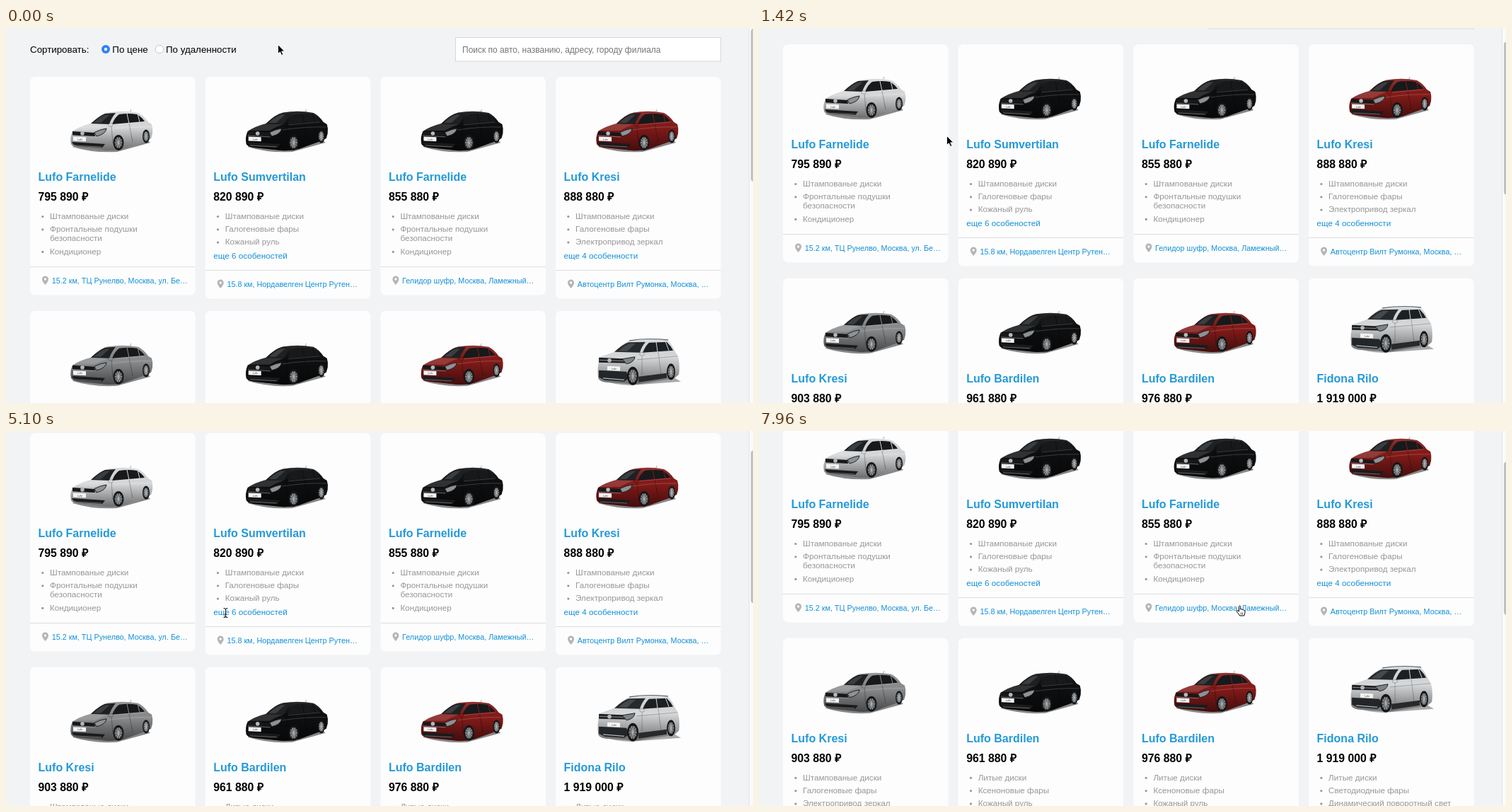
An HTML page for the animation above (8 s loop, 1056 by 530 pixels).

```html
<!DOCTYPE html>
<html lang="ru">
<head>
<meta charset="utf-8">
<title>Каталог</title>
<style>
  html, body { margin: 0; width: 100%; height: 100%; overflow: hidden; background: #f2f3f5; }
  svg { display: block; font-family: "Liberation Sans", Arial, sans-serif; }
  .head { font-size: 13.33px; }
  .hint { font-size: 12px; fill: #757575; }
  .title { font-size: 16px; font-weight: bold; fill: #2599d8; }
  .price { font-size: 15.8px; font-weight: bold; }
  .item { font-size: 11.7px; fill: #979797; }
  .more { font-size: 11.7px; fill: #1490d6; }
  .place { font-size: 10.8px; fill: #1490d6; }
  .plate { font-size: 3.6px; fill: #444; }
</style>
</head>
<body>
<svg id="stage" width="1056" height="530" viewBox="0 0 1056 530">
  <linearGradient id="shade" x2="0" y2="1">
    <stop offset="0" stop-color="#fff" stop-opacity=".12"/>
    <stop offset=".4" stop-color="#000" stop-opacity="0"/>
    <stop offset="1" stop-color="#000" stop-opacity=".5"/>
  </linearGradient>
</svg>
<script>
const LOOP = 8000, TICK = 117;

const path = (d, fill, extra = '') => `<path d="${d}" fill="${fill}" ${extra}/>`;
const line = (d, color, width = 1) => path(d, 'none', `stroke="${color}" stroke-width="${width}"`);
const oval = (x, y, rx, ry, fill, extra = '') =>
  `<ellipse cx="${x}" cy="${y}" rx="${rx}" ry="${ry}" fill="${fill}" ${extra}/>`;
const text = (x, y, cls, s) => `<text x="${x}" y="${y}" class="${cls}">${s}</text>`;
const shift = (x, y, s) => `<g transform="translate(${x} ${y})">${s}</g>`;

// Cars
const body = (d, color) => path(d, color) + path(d, 'url(#shade)');
const plate = (x, y) =>
  path(`M${x} ${y}l18 .8v6l-18 -.8z`, '#f4f4f4') + text(x + 6, y + 5, 'plate', 'Lufo');
const mirror = (x, y, color) => oval(x, y, 3.5, 2.3, color, 'stroke="#0006" stroke-width=".6"');
const badge = (x, y) => oval(x, y, 2.8, 2.8, '#b4b8bb');

function wheel(x, y, rx, ry) {
  let spokes = '';
  for (let i = 0; i < 10; i++) {
    const a = i * Math.PI / 5;
    spokes += line(`M${x} ${y}l${rx * .7 * Math.cos(a)} ${ry * .7 * Math.sin(a)}`, '#b5b7b9', .9);
  }
  return oval(x, y, rx, ry, '#141517') + oval(x, y, rx * .72, ry * .72, '#55585a') + spokes;
}

function sedan(color) {
  return path('M3 53Q32 62 66 60L113 47L102 38H20Z', '#0007') +
    line('M84 5L86 0', '#777', .6) +
    body('M1 49Q-1 39 3 31Q13 24 29 20Q42 7 53 4.500Q75 1 96 5Q104 9 110 18L115 21Q117 27 116 34L114 41L103 46L75 56Q62 59 50 58L12 54Q3 53 1 49Z', color) +
    path('M4 30Q15 23 29 20.500L54 21Q44 24 34 30Z', '#fff', 'opacity=".14"') +
    path('M29 20Q41 9 49 6L64 5Q58 12 55 21Z', '#1e2123') +
    path('M33 19Q42 10 50 7.500H56L43 19Z', '#fff', 'opacity=".13"') +
    path('M59 21Q63 11 69 7Q82 5 94 7Q101 11 105 17Z', '#17191b') +
    line('M80 6L83 20M95 6L98 18', color, 1) +
    line('M59 22L105 18M52 29Q85 24 114 25', '#fff4', .7) +
    line('M58 23L60 48M83 20L88 46', '#0007', .6) +
    path('M3 31L34 33L35 38L3 36.500Z', '#17181a') +
    line('M3 37L35 39', '#a0a4a7', .6) +
    path('M34 32.500Q43 28 51 27Q50 35 37 38Z', '#8d9296', 'stroke="#222" stroke-width="1"') +
    path('M2 46L49 49L45 54L10 52Q4 51 2 46Z', '#191b1d') +
    line('M6 51L44 53', '#999c9f', .6) +
    badge(17, 34) + plate(4, 38.5) + mirror(57, 22, color) +
    wheel(68, 47, 7.5, 11) + wheel(107, 38, 5, 9.5);
}

function suv(color) {
  return path('M2 59Q28 68 50 67L118 62L104 54H20Z', '#0005') +
    body('M1 57Q-1 39 4 27L24 20Q35 9 43 5Q68 0 99 3Q106 10 110 20L114 26Q117 40 115 52L108 58L56 66L12 63Q3 62 1 57Z', color) +
    line('M45 4Q70 0 100 3', '#5b5f62', 1.2) +
    path('M24 20Q36 9 44 6.500L68 6Q62 13 60 21Z', '#262a2d') +
    path('M30 19Q39 10 46 8H54L42 19Z', '#fff', 'opacity=".15"') +
    path('M64 21Q68 11 73 7L98 6Q104 12 107 18Z', '#1d2022') +
    line('M83 6L85 20M96 5L101 18', color, 1) +
    line('M56 31L113 26M63 23V52M86 20L90 53', '#0005', .7) +
    path('M58 55L98 50V57L58 63Z', '#27292b') +
    path('M2 28L44 30L46 36L2 35Z', '#1e2123') +
    line('M3 31.500L43 33', '#a9adb0', .8) +
    path('M35 30L53 27Q52 35 41 37Z', '#7d8387', 'stroke="#222" stroke-width="1"') +
    path('M2 46L41 48L45 57L38 62L10 60L2 56Z', '#232628') +
    line('M8 57L38 59.500', '#b4b7b9', 1.2) +
    badge(17, 32) + plate(14, 40) + mirror(63, 23, color) +
    wheel(50, 54, 8, 13) + wheel(104, 48, 6, 11.5);
}

// Page
const WHITE = '#d6d8da', BLACK = '#0e0f10', RED = '#831b19', GREY = '#8a8c8e';
const bags = ['Штампованые диски', 'Фронтальные подушки', '~безопасности', 'Кондиционер'];
const basic = ['Штампованые диски', 'Галогеновые фары', 'Кожаный руль'];
const mirrors = ['Штампованые диски', 'Галогеновые фары', 'Электропривод зеркал'];
const alloy = ['Литые диски', 'Ксеноновые фары', 'Кожаный руль'];
const city = ['Литые диски', 'Светодиодные фары', 'Динамический поворотный свет'];
const cars = [
  [sedan(WHITE), 'Lufo Farnelide', '795 890', bags, '', '15.2 км, ТЦ Рунелво, Москва, ул. Бе…'],
  [sedan(BLACK), 'Lufo Sumvertilan', '820 890', basic, 'еще 6 особеностей', '15.8 км, Нордавелген Центр Рутен…'],
  [sedan(BLACK), 'Lufo Farnelide', '855 880', bags, '', 'Гелидор шуфр, Москва, Ламежный…'],
  [sedan(RED), 'Lufo Kresi', '888 880', mirrors, 'еще 4 особенности', 'Автоцентр Вилт Румонка, Москва, …'],
  [sedan(GREY), 'Lufo Kresi', '903 880', mirrors],
  [sedan(BLACK), 'Lufo Bardilen', '961 880', alloy],
  [sedan(RED), 'Lufo Bardilen', '976 880', alloy],
  [shift(2, -8, suv(WHITE)), 'Fidona Rilo', '1 919 000', city]
];
const pin = path('M0 6Q-4.500 1 -4.500 -2A4.500 4.500 0 0 1 4.500 -2Q4.500 1 0 6Z', '#b5b5b5') +
  oval(0, -2, 1.7, 1.7, '#fdfdfe');

function card([car, title, price, items, more = '', place = ''], i) {
  const tall = more ? 5 : 0;
  let y = 182.5, list = '';
  for (const item of items) {
    const wrapped = item[0] === '~';
    y += wrapped ? 13.3 : 18.3;
    if (!wrapped) list += oval(17.8, y - 3.3, 1.6, 1.6, '#979797');
    list += text(28, y, 'item', item.replace('~', ''));
  }
  const foot = line('M0 268.500H233.500', '#dcdddf') + shift(21.5, 288, pin) +
    text(30.7, 292.3, 'place', place);
  return shift(34 + i % 4 * 247.7, i < 4 ? 69 : 399.8,
    `<rect width="233.5" height="${308.5 + tall}" rx="7" fill="#fdfdfe"/>` +
    shift(57, 46, car) + text(11.5, 147.3, 'title', title) + text(11.5, 175, 'price', price + ' ₽') +
    list + text(11.5, 257.3, 'more', more) + shift(0, tall, foot));
}

const header =
  text(34, 35, 'head', 'Сортировать:') +
  oval(141, 30, 6, 6, '#2f82f5') + oval(141, 30, 2.2, 2.2, '#fff') +
  text(150.3, 34.6, 'head', 'По цене') +
  oval(217, 30, 5.7, 5.7, '#fff', 'stroke="#c9c9cb"') +
  text(226, 34.6, 'head', 'По удаленности') +
  '<rect x="635.5" y="13.5" width="375" height="33.5" fill="#fff" stroke="#d5d7da"/>' +
  text(645, 35, 'hint', 'Поиск по авто, названию, адресу, городу филиала');

// Each cursor has its hot spot at 0, 0
const cursors = {
  arrow: path('M.5 .5V13.500L3.400 10.700L5.600 15.400L7.800 14.400L5.700 9.900H9.700Z', '#000', 'stroke="#fff" stroke-width=".9"'),
  hand: path('M-1 8V2Q-1 .6 .1 .6T1.200 2V5.500Q3 4.700 3.500 6Q5.300 5.500 5.700 6.800Q7.600 6.500 7.600 8.300Q7.600 11 6.300 14.500H0Q-1.300 11.500 -4 9.300Q-4.600 7.700 -3.300 7.400Q-2 7.300 -1 8.800Z', '#fff', 'stroke="#000"') +
    line('M2 10V13M4 10V13', '#000', .7),
  beam: line('M-3 -6.500Q0 -6.500 0 -4.500V4.500Q0 6.500 -3 6.500M3 -6.500Q0 -6.500 0 -4.500M0 4.500Q0 6.500 3 6.500M-1.500 2H1.500', '#222', 1.1)
};

// Key points: tick, then value
const scrollKeys = [[2, 0], [8, 11], [12, 46], [14, 65], [49, 66], [50, 82], [62, 82], [64, 88], [66, 107]];
const pointerKeys = [
  [0, 384, 23], [1, 379, 23], [8, 308, 81], [12, 265, 152], [16, 282, 196], [21, 63, 290],
  [24, 137, 325], [29, 223, 274], [31, 193, 270], [33, 283, 261], [35, 310.5, 257],
  [49, 310.5, 257], [51, 315, 339], [54, 317, 362], [58, 317, 362], [62, 357.5, 280.5],
  [66, 433, 271], [67, 433, 271], [68, 679.5, 246.5]
];
const shapeKeys = [[0, 'arrow'], [35, 'hand'], [43, 'beam'], [50, 'arrow'], [55, 'hand'],
  [58, 'arrow'], [62, 'beam'], [63, 'arrow'], [68, 'hand']];

const lastKey = (keys, tick) => keys.findLast(k => k[0] <= tick) || keys[0];

function between(keys, tick) {
  const [from, ...a] = lastKey(keys, tick);
  const next = keys.find(k => k[0] > tick);
  if (!next || tick < from) return a;
  const [to, ...b] = next;
  return a.map((v, i) => v + (b[i] - v) * (tick - from) / (to - from));
}

const byId = id => document.getElementById(id);
byId('stage').innerHTML += `<g id="page">${header}${cars.map(card).join('')}</g>` +
  '<rect x="1050" width="6" height="530" fill="#fafafa"/>' + line('M1050.500 0V530', '#e4e4e6') +
  '<rect id="thumb" x="1053" width="8" height="216" rx="4" fill="#c1c1c3"/><g id="cursor"/>';

function draw(now) {
  const tick = Math.floor(now % LOOP / TICK);
  const [scroll] = between(scrollKeys, tick);
  const [x, y] = between(pointerKeys, tick);
  byId('page').setAttribute('transform', `translate(0 ${-Math.round(scroll)})`);
  byId('thumb').setAttribute('y', 1 + scroll * .4);
  byId('cursor').innerHTML = shift(x, y, cursors[lastKey(shapeKeys, tick)[1]]);
  requestAnimationFrame(draw);
}
draw(0);
</script>
</body>
</html>
```
